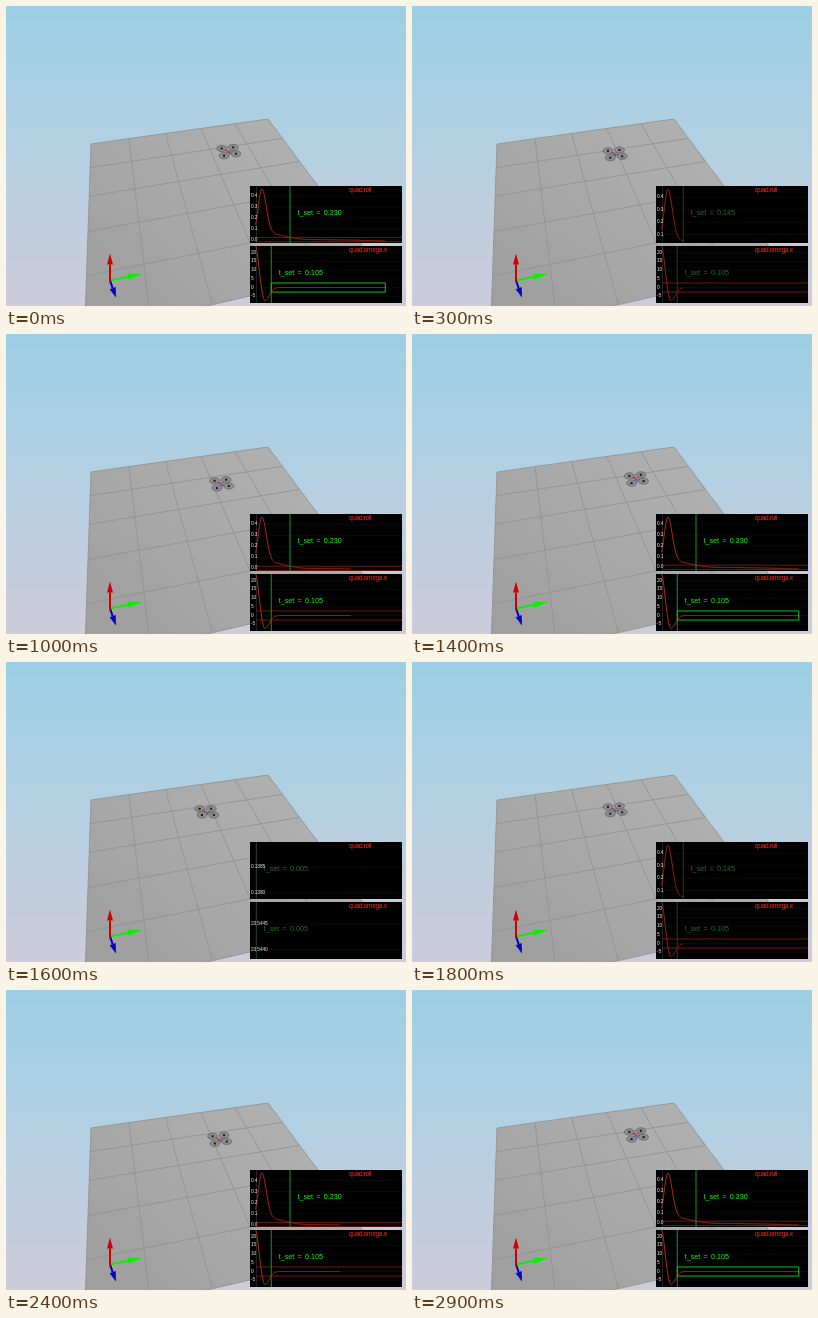
Animation, 400 px wide and 300 px high, one loop 3000 ms. Source, as an HTML page with a canvas:

```html
<!DOCTYPE html>
<html>
<head>
<meta charset="utf-8">
<style>
html, body { margin: 0; width: 100%; height: 100%; overflow: hidden; background: #b9d2e2; }
canvas { display: block; width: 400px; height: 300px; }
</style>
</head>
<body>
<canvas id="stage" width="400" height="300"></canvas>
<script>
const ctx = document.getElementById('stage').getContext('2d');
const LOOP = 3000, STEP = 100, CYCLE = 15, DT = 0.07, FIRST = 0.005;
const FONT = '"Liberation Sans", Arial, sans-serif';

// Bell curve with separate widths before and after its peak
const bell = (t, peak, rise, fall) => Math.exp(-(((t - peak) / (t < peak ? rise : fall)) ** 2));

// Step response: overshoot, a shoulder, then a slow drift below zero
const roll = t => .41 * bell(t, .042, .0327, .0425)
  + .06 / (1 + Math.exp((t - .2) / .045)) - .015 * (t / .9) ** 3;
const omega = t => 23.544 * bell(t, 0, .028, .028) - 7.6 * bell(t, .062, .024, .0415);

const flightX = t => 200.5 + 26.5 * t ** 1.25;
const flightY = t => 147.3 + 2.5 * Math.cos(2 * Math.PI * (t - .01) / .62);

const PANELS = [
  { top: 180, title: 'quad.roll', curve: roll, settle: .23, band: .02, textY: 209, color: '#b02818',
    tick: .1, digits: 1, high: 183, low: 235, early: [['0.1385', 205], ['0.1380', 231]] },
  { top: 240, title: 'quad.omega.x', curve: omega, settle: .105, band: 2.6, textY: 269, color: '#b82a18',
    tick: 5, digits: 0, high: 240.5, low: 294.5, early: [['23.5445', 262], ['23.5440', 288]], boxed: true }
];

function line(points, color, width = 1) {
  ctx.beginPath();
  points.forEach(([x, y]) => ctx.lineTo(x, y));
  ctx.strokeStyle = color;
  ctx.lineWidth = width;
  ctx.stroke();
}

function polygon(points, color) {
  ctx.beginPath();
  points.forEach(([x, y]) => ctx.lineTo(x, y));
  ctx.fillStyle = color;
  ctx.fill();
}

function text(str, x, y, size, color, spacing = 0, wordSpacing = 0) {
  ctx.font = size + 'px ' + FONT;
  ctx.letterSpacing = spacing + 'px';
  ctx.wordSpacing = wordSpacing + 'px';
  ctx.fillStyle = color;
  ctx.fillText(str, x, y);
}

function gradient(x0, y0, x1, y1, ...colors) {
  const fill = ctx.createLinearGradient(x0, y0, x1, y1);
  colors.forEach((color, i) => fill.addColorStop(i / (colors.length - 1), color));
  return fill;
}

// Projective map from the unit square to four corners
function projection([[x0, y0], [x1, y1], [x2, y2], [x3, y3]]) {
  const ax = x1 - x2, ay = y1 - y2, bx = x3 - x2, by = y3 - y2;
  const sx = x0 - x1 + x2 - x3, sy = y0 - y1 + y2 - y3, det = ax * by - bx * ay;
  const g = (sx * by - bx * sy) / det, h = (ax * sy - sx * ay) / det;
  return (u, v) => {
    const w = 1 + g * u + h * v;
    return [
      (x0 + (x1 - x0 + g * x1) * u + (x3 - x0 + h * x3) * v) / w,
      (y0 + (y1 - y0 + g * y1) * u + (y3 - y0 + h * y3) * v) / w
    ];
  };
}

const CORNERS = [[85, 138], [262, 113], [372, 260.6], [78.5, 328]];
const floorPoint = projection(CORNERS);

function drawScene() {
  ctx.fillStyle = gradient(0, 0, 0, 300, '#9bcfe4', '#b5d0e2', '#cccbda');
  ctx.fillRect(0, 0, 400, 300);
  polygon(CORNERS, gradient(262, 113, 110, 290, '#b0b0b0', '#a0a0a0'));
  for (let i = 0; i <= 5; i++) {
    const s = i / 5;
    line([floorPoint(s, 0), floorPoint(s, 1)], '#929292', .9);
    line([floorPoint(0, s), floorPoint(1, s)], '#929292', .9);
  }
}

function arrow(x, y, tipX, tipY, head, half, color) {
  const dx = tipX - x, dy = tipY - y, len = Math.hypot(dx, dy);
  const ux = dx / len, uy = dy / len, bx = tipX - ux * head, by = tipY - uy * head;
  line([[x, y], [bx, by]], color, 2);
  polygon([[tipX, tipY], [bx - uy * half, by + ux * half], [bx + uy * half, by - ux * half]], color);
}

function drawAxes() {
  arrow(104, 274.5, 136.5, 267.7, 15, 3, '#08f000');
  arrow(104, 274.5, 110, 291.5, 10, 3.2, '#0000c8');
  arrow(104, 275.5, 104, 247.5, 11, 3, '#d00000');
}

function drawDrone(t) {
  const level = Math.min(1, t / .2);
  const rotors = [[-6.9, -3], [4.6, -3.1 - level], [-4.6, 3.2 + level], [7.3, 3.2 - level]];
  ctx.save();
  ctx.translate(flightX(t), flightY(t));
  line([rotors[0], rotors[3]], '#505054', 1.1);
  line([rotors[1], rotors[2]], '#505054', 1.1);
  for (const [x, y] of rotors) {
    ctx.beginPath();
    ctx.ellipse(x, y, 5, 3.1, 0, 0, Math.PI * 2);
    ctx.fillStyle = '#8c8c8c';
    ctx.fill();
    ctx.strokeStyle = '#686868';
    ctx.lineWidth = .8;
    ctx.stroke();
    ctx.fillStyle = '#181818';
    ctx.fillRect(x - 1, y - 1, 2, 2);
  }
  ctx.fillStyle = '#b9a3b3';
  ctx.fillRect(-1.5, -1, 3, 2);
  line([[-4, -1.3], [0, .3]], '#c43a48', 1.2);
  line([[0, 0], [1.2, 2.8]], '#3c3cae', 1.2);
  ctx.restore();
}

const plotX = t => 249.5 + 150 * t;

function tickLabels({ tick, digits }, min, max, plotY) {
  const labels = [];
  for (let i = Math.ceil(min / tick); i * tick <= max; i++) {
    labels.push([(i * tick + 0).toFixed(digits), plotY(i * tick)]);
  }
  return labels;
}

function drawPanel(panel, t) {
  const { top, curve, settle, band, high, low } = panel;
  const times = Array.from({ length: 301 }, (_, i) => t * i / 300);
  const values = times.map(curve);
  const max = Math.max(...values), min = Math.min(...values);
  const plotY = v => high + (max - v) / (max - min) * (low - high);
  const started = t > .01, boxed = panel.boxed && t > .7;
  const confirmed = t > settle + .1, mark = Math.min(t, settle), markX = plotX(mark);

  ctx.save();
  ctx.beginPath();
  ctx.rect(244, top, 152, 57);
  ctx.clip();
  ctx.fillStyle = '#000';
  ctx.fillRect(244, top, 152, 57);

  const labels = started ? tickLabels(panel, min, max, plotY) : panel.early;
  for (const [, y] of labels) line([[250, y], [396, y]], '#121212', .6);
  line([[250.5, top], [250.5, top + 57]], '#202020');

  if (started) {
    if (!boxed && t > settle) {
      for (const v of [band, -band]) line([[250, plotY(v)], [396, plotY(v)]], '#7c1c12', .9);
    }
    line(times.map((s, i) => [plotX(s), plotY(values[i])]), panel.color);
  }
  line([[markX, top], [markX, top + 57]], confirmed ? '#129a12' : '#243c24');
  if (boxed) {
    ctx.strokeStyle = '#10c410';
    ctx.lineWidth = 1;
    ctx.strokeRect(markX, plotY(band), plotX(t) - markX, plotY(-band) - plotY(band));
  }
  text('t_set = ' + mark.toFixed(3), markX + 7.5, panel.textY, 7.2, confirmed ? '#14fa14' : '#2c6a2c', 0, 1.2);
  text(panel.title, 343, top + 6, 6.6, '#f42a18', -.35);
  for (const [label, y] of labels) text(label, 245, y + 1, 4.8, '#f0f0f0', -.1);
  ctx.restore();
}

// The loop opens on the tail of one run, then plays two runs
function simTime(step) {
  return step === 0 ? .865 : FIRST + DT * ((step - 1) % CYCLE);
}

function render(now) {
  const t = simTime(Math.floor((now % LOOP) / STEP));
  drawScene();
  drawAxes();
  drawDrone(t);
  PANELS.forEach(panel => drawPanel(panel, t));
}

const start = performance.now();
function tick() {
  render(performance.now() - start);
  requestAnimationFrame(tick);
}
tick();
</script>
</body>
</html>
```
